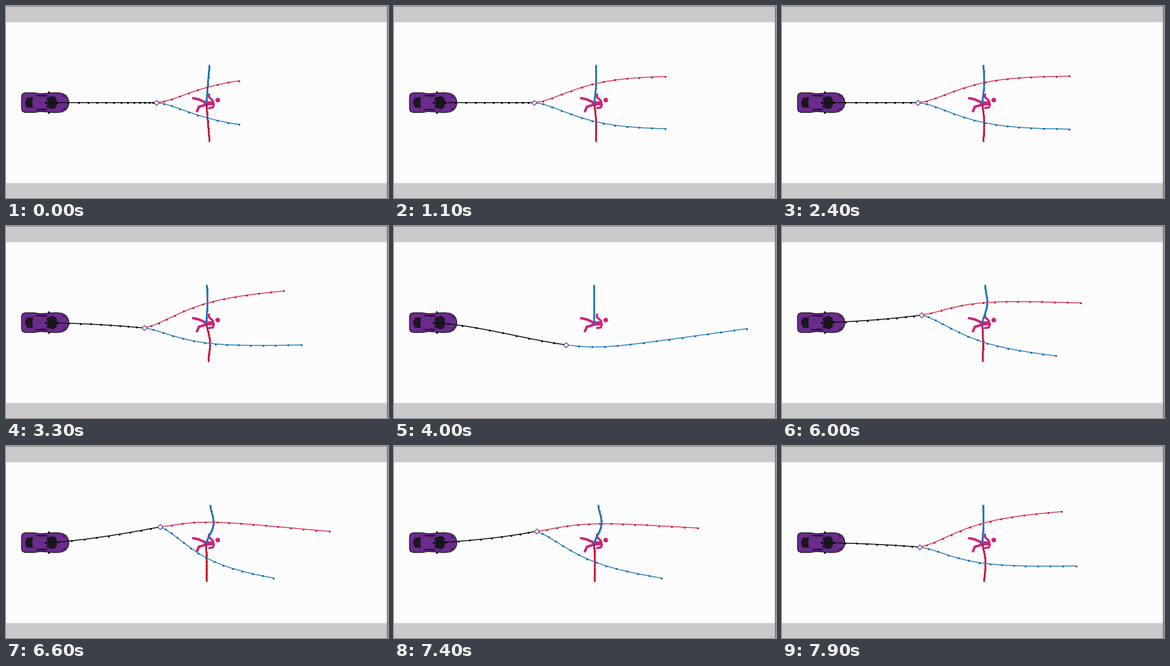
Write a matplotlib script that moves like this. It is 600 px wide and 302 px high and loops after 8000 ms.

```python
import numpy as np
import matplotlib.pyplot as plt
from matplotlib.animation import FuncAnimation
from matplotlib.patches import Circle, Polygon, Rectangle

W, H, DPI = 600, 302, 100
PX = 72 / DPI
FRAMES, STEP_MS = 80, 100
MID, START_X, WALK_X = 152, 62, 314.3
HORIZON = 24

RED, RED_DOT = "#d8405a", "#be1430"
BLUE, BLUE_DOT = "#2f86c1", "#10649f"
WALK_RED, WALK_BLUE = "#c01231", "#1c72b0"
MAGENTA, PURPLE, DARK = "#c9277c", "#6b2b8d", "#1c1620"

# Time in ms against how early the fork is (0..1) and the preference (-5..5).
EARLY_KEYS = [(0, 0), (400, .31), (500, .31), (700, .52), (800, .52),
              (1300, .82), (1700, .975), (2400, 1)]
LEAN_KEYS = [(2400, 0), (2600, .2), (3500, 2.9), (4000, 5), (4500, 5), (5200, 1),
             (6000, -3), (6300, -4), (6400, -4), (6900, -5), (7300, -4.04),
             (7400, -4), (7900, 2)]


def at(ms, keys):
    return np.interp(ms, *zip(*keys))


def mix(a, b, t):
    return a + (b - a) * t


def stretch(s, bend):
    """Uneven spacing on 0..1: positive bend slows down, negative speeds up."""
    return s + bend * s * (1 - s)


def settle(s, start, goal, drift, rate, power):
    """Leave start and settle on the line goal + drift * s."""
    return goal + drift * s + (start - goal) * np.exp(-rate * s**power)


def walk_bend(s, end, bulge):
    return end * s + bulge * np.abs(np.sin(np.pi * s))**1.5


fig = plt.figure(figsize=(W / DPI, H / DPI), dpi=DPI)
ax = fig.add_axes([0, 0, 1, 1])
ax.set(xlim=(0, W), ylim=(H, 0))
ax.axis("off")


def shape(points, color, edge="none", width=0):
    ax.add_patch(Polygon(points, fc=color, ec=edge, lw=width * PX, zorder=2,
                         joinstyle="round"))


def flip(points):
    return [(x, 2 * MID - y) for x, y in points]


def symmetric(half, color, **kw):
    """A closed shape from its upper half."""
    shape(half + flip(half)[::-1], color, **kw)


def pair(points, color):
    """The same shape on both sides of the car."""
    shape(points, color)
    shape(flip(points), color)


def stroke(points, width, color=MAGENTA):
    ax.plot(*zip(*points), color=color, lw=width * PX, zorder=3, snap=False,
            solid_capstyle="round", solid_joinstyle="round")


def rect(x, y, w, h, color):
    ax.add_patch(Rectangle((x, y), w, h, fc=color, zorder=1, snap=False))


def draw_road():
    rect(0, 0, W, H, "#fdfcfd")
    rect(0, 0, W, 25.5, "#cbc9cb")
    rect(0, 278.5, W, 24, "#cbc9cb")
    rect(0, 0, W, 1, "#7f7d7f")
    rect(598.3, 0, 1.7, H, "#7a787a")


def draw_car():
    pair([(66, 137), (66, 134), (69, 135), (70, 138)], DARK)
    symmetric([(24.3, 150), (24.5, 141), (26, 138), (30, 136.5), (44, 136.5),
               (54, 138), (64, 137.3), (78, 136.3), (88, 137.3), (94, 140.5),
               (97.5, 145.5), (98.6, 150)], PURPLE, edge=DARK, width=1.2)
    pair([(44, 141.5), (50, 139.8), (62, 139.8), (67, 141.5), (60, 142.6)], DARK)
    pair([(86, 139), (92, 141.5), (96, 146), (91, 143)], "#3b1a50")
    symmetric([(30, 150), (33, 144.3), (42.5, 143.5), (41.5, 150)], DARK)
    symmetric([(65, 151), (63.5, 144.5), (74, 141.3), (79, 144.5), (80.3, 151)], DARK)


def draw_walker():
    stroke([(294, 145), (303, 147), (314, 152)], 4)
    stroke([(300, 165.5), (303, 158.5), (315, 155)], 4)
    stroke([(314, 153.5), (324, 153)], 6.5)
    stroke([(319, 139), (318.5, 143), (325, 149)], 3.4)
    stroke([(325, 150), (326.5, 155), (325, 159.5), (319, 160.5)], 3.4)
    ax.add_patch(Circle((332.6, 148), 3.7, fc=MAGENTA, zorder=3))


def track(color, dot, width, size):
    return ax.plot([], [], color=color, lw=width * PX, marker="o", ms=size * PX,
                   mfc=dot, mec="none", zorder=5, snap=False)[0]


draw_road()
draw_car()
draw_walker()
walk_red = track(WALK_RED, WALK_RED, 2, 3)
walk_blue = track(WALK_BLUE, WALK_BLUE, 2, 3)
path_red = track(RED, RED_DOT, 1.5, 3)
path_blue = track(BLUE, BLUE_DOT, 1.5, 3)
path_stem = track("#111111", "#000000", 1.5, 3)
fork_mark = ax.plot([], [], "D", ms=6.2 * PX, mfc="white", mec="#64388f",
                    mew=1.2 * PX, zorder=7, snap=False)[0]
artists = [walk_red, walk_blue, path_red, path_blue, path_stem, fork_mark]


def update(frame):
    ms = frame * STEP_MS
    early, signed = at(ms, EARLY_KEYS), at(ms, LEAN_KEYS)
    lean, side = min(abs(signed), 4), 1 if signed >= 0 else -1
    sure = max(abs(signed) - 4, 0)
    steps = round(15 - 5 * early)

    def by_lean(none, strong, certain):
        return np.interp(abs(signed), [0, 4, 5], [none, strong, certain])

    # Shared path up to the fork.
    fork_x = mix(236, 213, early) + .69 * lean**2 + 46 * sure
    fork_y = 2.5 * lean + .5 * lean**2 + 17 * sure
    s = np.linspace(0, 1, steps + 1)
    spacing = mix(.6, .28, early) - .01 * lean - .14 * sure
    path_stem.set_data(START_X + (fork_x - START_X) * stretch(s, spacing),
                       MID + side * fork_y * (s**1.35 + .6 * sure * s**2 * (1 - s)))
    fork_mark.set_data([fork_x], [MID + side * fork_y])

    # The likely branch bends back, the unlikely one swings further out.
    s = np.linspace(0, 1, HORIZON - steps + 1)
    end_x = mix(366, 451, early)
    rate = mix(1.7, 4.6, early)
    likely_end = end_x + 4.5 * lean + .5 * lean**2 + 77 * sure
    likely_y = settle(s, fork_y, by_lean(42, 40, 49.3),
                      -1.06 * lean**2 - 22.8 * sure,
                      rate + by_lean(0, 1.9, 5.7), by_lean(1.7, 1.4, 1.2))
    unlikely_end = end_x - 4.5 * lean - .8 * lean**2
    unlikely_y = settle(s, fork_y, by_lean(-42, -11, -11), -11.25 * lean,
                        rate + .15 * lean, 1.7 + .075 * lean)
    likely_x = mix(fork_x, likely_end, stretch(s, by_lean(-.22, -.15, 0)))
    unlikely_x = mix(fork_x, unlikely_end, stretch(s, -.22 - .04 * lean))

    t = np.linspace(0, 1, 25)
    end, bulge = mix(5, 2, early), 2 * early
    likely_bend = walk_bend(t, end * by_lean(1, .3, 0), bulge * by_lean(1, .2, 0))
    unlikely_bend = walk_bend(t, end + .28 * lean**2, bulge + .375 * lean**2)

    blue, red = (path_blue, walk_blue, -1), (path_red, walk_red, 1)
    main, other = (blue, red) if side > 0 else (red, blue)
    for (path, walk, way), x, y, bend, shown in (
            (main, likely_x, likely_y, likely_bend, True),
            (other, unlikely_x, unlikely_y, unlikely_bend, sure < .95)):
        path.set_data(x, MID + side * y)
        walk.set_data(WALK_X + bend, 152.5 + way * 59 * t)
        path.set_visible(shown)
        walk.set_visible(shown)
    return artists


anim = FuncAnimation(fig, update, frames=FRAMES, interval=STEP_MS, repeat=True,
                     repeat_delay=0, blit=False)
plt.show()
```
